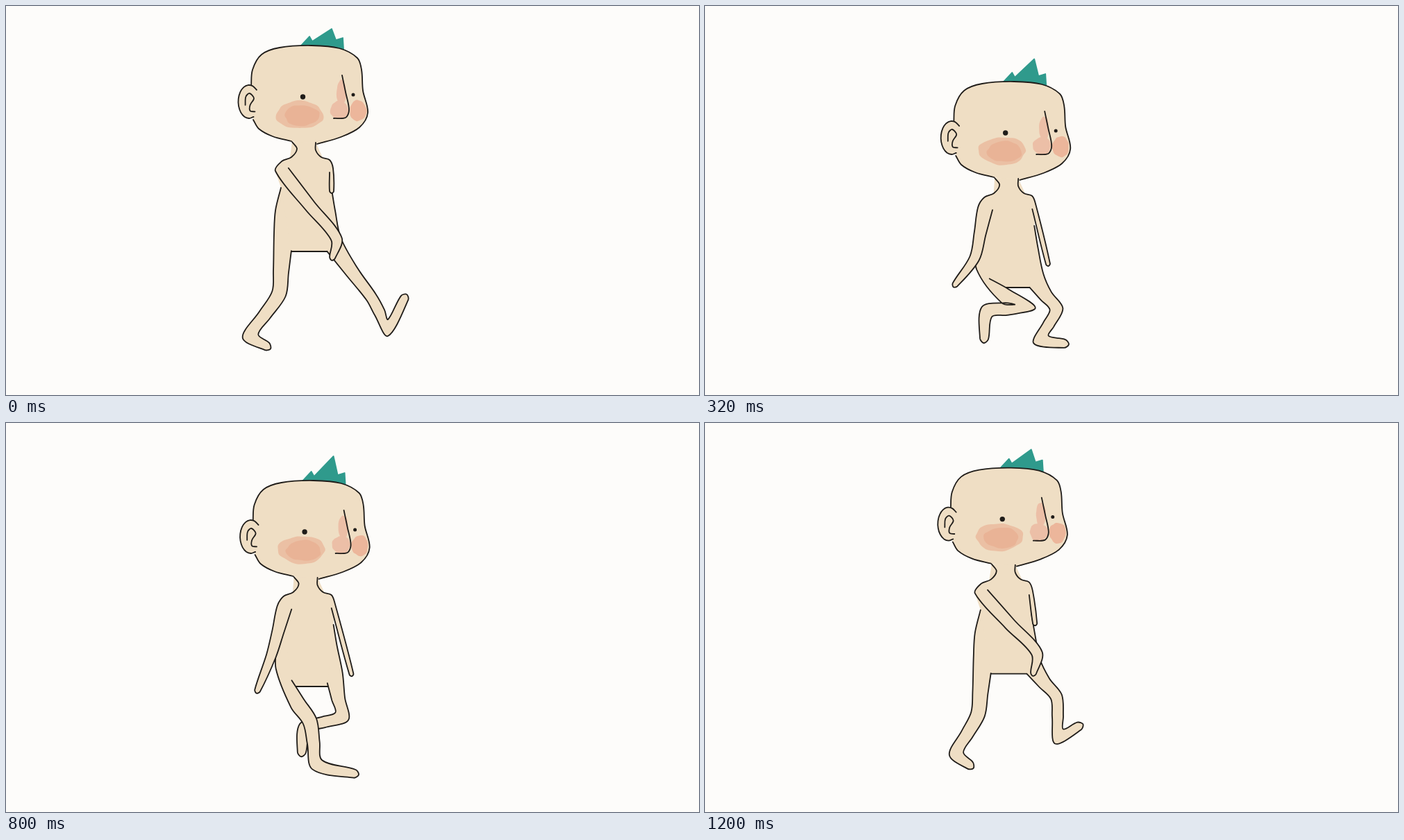
Animation, 998 px wide and 561 px high, one loop 1280 ms. Source, as an HTML page:

```html
<!DOCTYPE html>
<html lang="en">
<head>
<meta charset="utf-8">
<title>Walk cycle</title>
<style>
  html, body { margin: 0; width: 100%; height: 100%; overflow: hidden; background: #fdfcfa; }
  svg { display: block; width: 100%; height: 100%; }
</style>
</head>
<body>
<svg id="stage" viewBox="0 0 998 561"></svg>
<script>
const STEP = 80, STEPS = 16;
const SKIN = '#efdec4', INK = '#1f1c19', HAIR = '#2f9a8c';

// Joint keys: step, then x and y of each joint.
const legKeys = [ // knee, ankle, toe
  [0, 393,415, 352,476, 376,491],
  [1, 412,437, 360,438, 359,491],
  [4, 461,433, 406,441, 402,480],
  [6, 456,388, 438,454, 468,480],
  [8, 437,415, 470,490, 481,447],
  [9, 437,420, 464,494, 522,503],
  [12, 434,446, 413,488, 442,493],
  [15, 393,420, 362,477, 382,494]
];
const farLegKeys = [
  [0, 526,420, 550,464, 574,421],
  [1, 519,433, 538,479, 590,489],
  [4, 506,437, 484,481, 518,487],
  [6, 478,430, 452,482, 484,491],
  [8, 468,408, 413,474, 422,489],
  [9, 470,420, 411,450, 410,486],
  [12, 510,422, 474,430, 469,453],
  [15, 506,395, 510,452, 539,437]
];
const armKeys = [ // wrist, hand
  [0, 476,336, 470,363],
  [1, 430,330, 412,380],
  [4, 388,364, 360,402],
  [6, 367,344, 339,375],
  [8, 367,325, 341,367],
  [12, 406,347, 393,400],
  [15, 478,332, 473,361]
];

const pairs = v => v.flatMap((x, i) => i % 2 ? [] : [[x, v[i + 1]]]);

// Fixed shapes, drawn at the top of the bob.
const skull = pairs([353,117, 355,92, 368,70, 394,60, 440,57, 480,61, 506,75, 512,92, 514,122, 521,154, 509,175, 482,189, 448,199]);
const jaw = pairs([411,195, 384,188, 364,177, 356,164]);
const nose = pairs([484,100, 489,124, 494,150, 489,161, 472,162]);
const curl = pairs([-.35,.2, -.3,-.3, .05,-.5, .45,-.2, .1,.2, .1,.55, .55,.6]);
const neckLeft = pairs([412,196, 419,206, 411,218, 397,224, 388,238]);
const neckRight = pairs([446,197, 446,208, 454,218, 466,222, 471,234]);
const sideLeft = pairs([396,262, 388,295, 386,328]);
const sideRight = pairs([469,265, 474,295, 482,334]);
const bottom = pairs([411,354, 472,354]);

// Smooth cyclic interpolation between joint keys.
function sample(keys, s) {
  const n = keys.length;
  const get = i => {
    const [at, ...v] = keys[(i + n) % n];
    return { at: at + STEPS * Math.floor(i / n), v };
  };
  let i = n - 1;
  while (keys[i][0] > s) i--;
  const [a, b, c, d] = [get(i - 1), get(i), get(i + 1), get(i + 2)];
  const span = c.at - b.at, u = (s - b.at) / span, u2 = u * u, u3 = u2 * u;
  return pairs(b.v.map((p, j) => {
    const q = c.v[j];
    const m0 = (q - a.v[j]) / (c.at - a.at) * span;
    const m1 = (d.v[j] - p) / (d.at - b.at) * span;
    return (2*u3 - 3*u2 + 1) * p + (u3 - 2*u2 + u) * m0 + (3*u2 - 2*u3) * q + (u3 - u2) * m1;
  }));
}

const fix = p => p[0].toFixed(1) + ' ' + p[1].toFixed(1);
const dist = (a, b) => Math.hypot(a[0] - b[0], a[1] - b[1]);
const lines = pts => 'M' + pts.map(fix).join('L');

// Curve through points, with handles scaled to each segment.
function curve(pts, closed) {
  const n = pts.length;
  const at = i => closed ? pts[(i + n) % n] : pts[Math.max(0, Math.min(n - 1, i))];
  const handle = (i, len) => {
    const a = at(i - 1), p = at(i), b = at(i + 1);
    const k = len / 3 / (dist(a, p) + dist(p, b) || 1);
    return [p[0] + (b[0] - a[0]) * k, p[1] + (b[1] - a[1]) * k];
  };
  let d = 'M' + fix(pts[0]);
  for (let i = 0; i < (closed ? n : n - 1); i++) {
    const len = dist(at(i), at(i + 1));
    d += 'C' + [handle(i, len), handle(i + 1, -len), at(i + 1)].map(fix).join(' ');
  }
  return d;
}

// Outline of a limb: back edge down, round tip, front edge up.
function limb(joints, widths) {
  const spine = [], half = [];
  joints.forEach((p, i) => {
    spine.push(p);
    half.push(widths[i]);
    if (i < joints.length - 2) {
      const q = joints[i + 1];
      spine.push([(p[0] + q[0]) / 2, (p[1] + q[1]) / 2]);
      half.push((widths[i] + widths[i + 1]) / 2);
    }
  });
  const last = spine.length - 1;
  const normal = i => {
    const a = spine[i], b = spine[i + 1], len = dist(a, b) || 1;
    return [(a[1] - b[1]) / len, (b[0] - a[0]) / len];
  };
  const back = [], front = [];
  spine.forEach(([x, y], i) => {
    const n = normal(Math.max(0, i - 1)), m = normal(Math.min(last - 1, i));
    const sum = [n[0] + m[0], n[1] + m[1]], len = Math.hypot(...sum) || 1;
    const k = half[i] * Math.min(1.5, 2 / len) / len;
    back.push([x + sum[0] * k, y + sum[1] * k]);
    front.unshift([x - sum[0] * k, y - sum[1] * k]);
  });
  const n = normal(last - 1), r = half[last];
  const tip = [spine[last][0] + n[1] * r, spine[last][1] - n[0] * r];
  return [...back, tip, ...front];
}

// Slightly uneven ellipse, like a dab of watercolour.
function dab([x, y], rx, ry, phase) {
  const pts = [];
  for (let i = 0; i < 18; i++) {
    const a = i / 18 * Math.PI * 2;
    const k = 1 + 0.04 * Math.sin(3 * a + phase) + 0.03 * Math.sin(7 * a + 2 * phase);
    pts.push([x + rx * k * Math.cos(a), y + ry * k * Math.sin(a)]);
  }
  return curve(pts, true);
}

const stage = document.getElementById('stage');
function layer(fill, stroke = 'none', opacity = 1) {
  const el = document.createElementNS('http://www.w3.org/2000/svg', 'path');
  const set = { fill, stroke, opacity, 'stroke-width': 1.8, 'stroke-linecap': 'round', 'stroke-linejoin': 'round' };
  for (const k in set) el.setAttribute(k, set[k]);
  return stage.appendChild(el);
}

const art = {
  hair: layer(HAIR, HAIR),
  head: layer(SKIN),
  cheek: layer('#e9ae90', 'none', 0.6),
  cheekCore: layer('#e8a88a', 'none', 0.5),
  noseBlush: layer('#ecac95', 'none', 0.6),
  farCheek: layer('#eba88d', 'none', 0.75),
  headLine: layer('none', INK),
  ear: layer(SKIN, INK),
  curl: layer('none', INK),
  nose: layer('none', INK),
  eyes: layer(INK),
  torso: layer(SKIN),
  bottom: layer('none', INK),
  farLeg: layer(SKIN, INK),
  farArm: layer(SKIN, INK),
  leg: layer(SKIN, INK),
  arm: layer(SKIN, INK)
};
const draw = (name, d) => art[name].setAttribute('d', d);
const dot = ([x, y], r) => `M${x - r} ${y}a${r} ${r} 0 1 0 ${2 * r} 0a${r} ${r} 0 1 0 ${-2 * r} 0`;

// The body sinks twice per cycle; the far arm and hair swell once.
const bob = s => 26 * (1 - Math.cos(s * Math.PI / 4));
const swell = s => Math.sin(s * Math.PI / STEPS);
const mover = s => ([x, y]) => [x + bob(s) * 0.1, y + bob(s)];

function drawHead(s) {
  const move = mover(s), at = (x, y) => move([x, y]);
  const tuft = pairs([424,58, 437,44, 441,51, 469,33 - 12 * swell(s), 475,49, 485,46, 486,62]);
  draw('hair', lines(tuft.map(move)) + 'Z');
  draw('head', curve([...skull, ...jaw].map(move), true));
  draw('headLine', curve(skull.map(move)) + curve(jaw.map(move)));

  draw('cheek', dab(at(423, 157), 34, 20, s));
  draw('cheekCore', dab(at(426, 158), 25, 15, s + 2));
  draw('farCheek', dab(at(507, 151), 12, 15, s + 1));
  draw('noseBlush', dab(at(480, 150), 13, 13, s) + dab(at(483, 125), 7, 18, s));

  const rim = [];
  for (let deg = -45; deg >= -295; deg -= 25) {
    const a = deg * Math.PI / 180;
    rim.push(at(350 + 15.5 * Math.cos(a), 138 + 24 * Math.sin(a)));
  }
  draw('ear', curve(rim));
  draw('curl', curve(curl.map(([x, y]) => at(350 + 15.5 * x, 138 + 24 * y))));
  draw('nose', curve(nose.map(move)));
  draw('eyes', dot(at(427.5, 131), 3.7) + dot(at(500, 128), 2.5));
}

function drawBody(s) {
  const move = mover(s), at = (x, y) => move([x, y]);
  const [neckL, neckR, sideL, sideR, base] =
    [neckLeft, neckRight, sideLeft, sideRight, bottom].map(pts => pts.map(move));
  draw('torso', lines([...neckL, ...sideL, ...base, ...sideR.toReversed(), ...neckR.toReversed()]) + 'Z');
  draw('bottom', lines(base));

  const farLeg = limb([at(471, 347), ...sample(farLegKeys, s)], [11, 8, 8, 6]);
  draw('farLeg', curve([...farLeg.slice(0, -1), ...sideR.toReversed()]));
  const farHand = at(469 + 28 * swell(s), 267 + 75 * swell(s));
  const farArm = limb([at(470, 240), farHand], [4, 3]);
  draw('farArm', curve([...neckR, ...farArm.toReversed().slice(1)]));

  const leg = limb([at(399, 352), ...sample(legKeys, s)], [12, 10, 8, 6]);
  draw('leg', curve([...sideL, ...leg.slice(1)]));
  const arm = limb([at(399, 240), ...sample(armKeys, s)], [10, 7, 4]);
  draw('arm', curve([...neckL, ...arm.slice(1)]));
}

function render(ms) {
  const s = Math.floor(ms / STEP) % STEPS;
  drawHead(s);
  drawBody(s);
}

const start = performance.now();
function tick() {
  render(performance.now() - start);
  requestAnimationFrame(tick);
}
tick();
</script>
</body>
</html>
```
